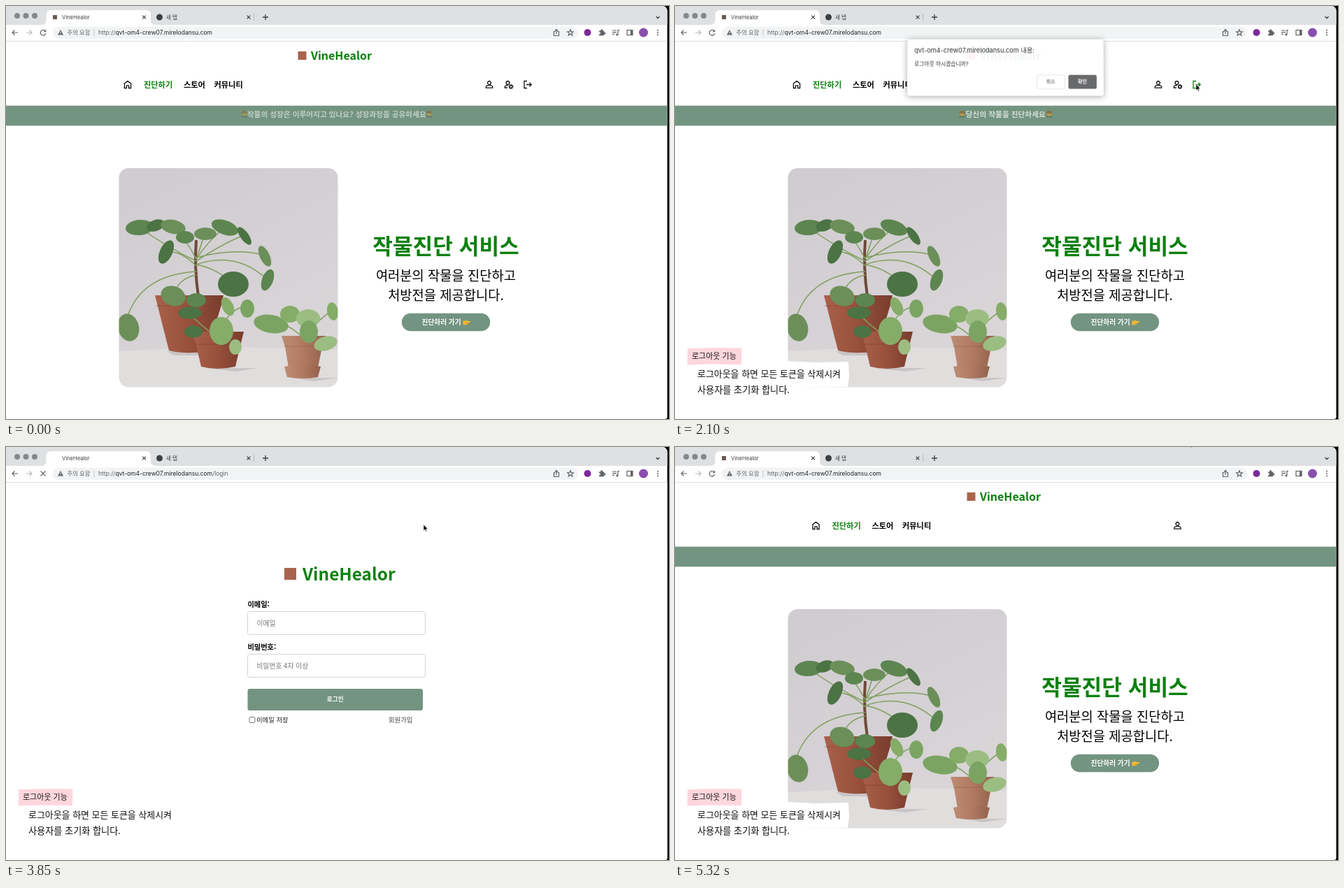
An HTML page that plays this animation: 948 by 591 pixels, repeating every 5.39 s.

```html
<!DOCTYPE html>
<html lang="ko">
<head>
<meta charset="utf-8">
<title>VineHealor</title>
<style>
html, body { margin: 0; width: 100%; height: 100%; overflow: hidden; background: #000; }
svg { position: absolute; left: 0; top: 0; overflow: visible; }
#stage, #pointer { width: 948px; height: 591px; overflow: hidden; }
text { font-family: "Noto Sans CJK KR", "Noto Sans", sans-serif; white-space: pre; }
.ui { font-family: Inter, "Noto Sans CJK KR", sans-serif; }
.bold { font-weight: 700; }
.mid { text-anchor: middle; }
.green { fill: #0c800f; }
.line { fill: none; stroke: currentColor; stroke-width: 1.3; }
.thin { fill: none; stroke: #5f6368; stroke-width: 1.2; }

/* One clock for everything: 5390 ms */
.a { animation: 5390ms linear infinite; }
.step { animation-timing-function: step-end; }
.before { animation-name: before; }
.login { animation-name: login; }
.after { animation-name: after; }
.idle { animation-name: idle; }
.busy { animation-name: busy; }
.user { animation-name: user; }
.exit { animation-name: exit; }
.hero { animation-name: hero; }
.msg1 { animation-name: msg1; }
.msg2 { animation-name: msg2; }
.note { animation-name: note; }
.move { animation-name: move; animation-timing-function: ease-in-out; }
.arrow { animation-name: arrow; }
.hand { animation-name: hand; }
#alert {
  left: 332px; top: 48px; width: 281px; height: 81px;
  transform-origin: 50% 100%; animation-name: alert;
  filter: drop-shadow(0 1px 4px rgba(0,0,0,.38));
}
@keyframes before { 0% { opacity: 1 } 64.38%, 100% { opacity: 0 } }
@keyframes login {
  0% { opacity: 0; fill-opacity: 0 }
  64.38% { opacity: 1; fill-opacity: 1 }
  72.36%, 100% { opacity: 0; fill-opacity: 0 }
}
@keyframes after { 0% { opacity: 0 } 72.36%, 100% { opacity: 1 } }
@keyframes idle { 0% { opacity: 1 } 64.38% { opacity: 0 } 74%, 100% { opacity: 1 } }
@keyframes busy { 0% { opacity: 0 } 64.38% { opacity: 1 } 74%, 100% { opacity: 0 } }
@keyframes user { 0% { color: #111 } 16.3% { color: #108010 } 27.5%, 100% { color: #111 } }
@keyframes exit { 0% { color: #111 } 30.3%, 100% { color: #108010 } }
@keyframes hero {
  0%, 72.3% { opacity: 1 }
  72.36% { opacity: 0; animation-timing-function: ease }
  85.4%, 100% { opacity: 1 }
}
@keyframes msg1 {
  0% { transform: translateY(-2.5px); opacity: .56 }
  6% { opacity: .66 }
  32.46% { transform: translateY(1.2px); opacity: .66 }
  32.47%, 100% { transform: none; opacity: 0 }
}
@keyframes msg2 {
  0%, 32.46% { transform: translateY(-3px); opacity: 0 }
  32.47% { transform: translateY(-3px); opacity: .2 }
  38% { opacity: .7 }
  51.95% { transform: translateY(-.9px) }
  60%, 100% { transform: none; opacity: .7 }
}
@keyframes note {
  0%, 11.69% { transform: translateX(-250px); animation-timing-function: cubic-bezier(.3,.5,.3,1) }
  23.4%, 100% { transform: none }
}
@keyframes alert {
  0%, 36.2% { opacity: 0; transform: perspective(600px) translateY(-8px) rotateX(20deg) }
  39.15%, 64.75% { opacity: 1; transform: perspective(600px) translateY(0) rotateX(0) }
  66.23% { opacity: .63; transform: perspective(600px) translateY(-4px) rotateX(10deg) }
  67.7%, 100% { opacity: 0; transform: perspective(600px) translateY(-8px) rotateX(20deg) }
}
@keyframes move {
  0%, 6.5% { transform: translate(733px, 36px) }
  16.7%, 25.97% { transform: translate(692px, 113px) }
  31.2%, 40.5% { transform: translate(745px, 112px) }
  51%, 64% { transform: translate(598px, 111.5px) }
  66%, 76.5% { transform: translate(597px, 111px) }
  80.5% { transform: translate(602px, 109px) }
  86.5%, 94.8% { transform: translate(735px, 8px) }
  98.5%, 100% { transform: translate(735px, -9px) }
}
@keyframes arrow {
  0% { opacity: 0 } 6.5% { opacity: 1 } 16.3% { opacity: 0 } 36.7%, 100% { opacity: 1 }
}
@keyframes hand { 0% { opacity: 0 } 16.3% { opacity: 1 } 36.7%, 100% { opacity: 0 } }
</style>
</head>
<body>
<svg id="stage" viewBox="0 0 948 591">
  <defs>
    <g id="home"><path class="line" d="M-4.6 5V-1.6L0-5.2 4.6-1.6V5H1.6V1.3H-1.6V5Z"/></g>
    <g id="person" class="line">
      <circle cy="-2.6" r="2.4"/>
      <path d="M-4.7 4.6V3.2C-4.7 1.6-1.6.9 0 .9S4.7 1.6 4.7 3.2V4.6Z"/>
    </g>
    <g id="cross"><path d="M-2.4-2.4 2.4 2.4M2.4-2.4-2.4 2.4" fill="none" stroke="#3c4043" stroke-width="1.2"/></g>
    <g id="farmer">
      <path d="M-4.5 5Q-4 1 0 1T4.5 5Z" fill="#56765a"/>
      <circle r="3" fill="#d99a35"/>
      <path d="M-5-1Q-3-2-2.6-4.6H2.6Q3-2 5-1Z" fill="#8b6526"/>
    </g>
    <g id="point">
      <path d="M-5-2H-1L0-3 1.8-2.2 1-1.4H5.3Q6.4-.2 5.3.6H2Q3 3.6 0 3.8H-5Z" fill="#f5b92e"/>
      <path d="M-1.5 1.4H1.8M-1.5 2.6H1.5" stroke="#c98517" stroke-width=".5"/>
    </g>
    <g id="links" class="bold" font-size="11.2">
      <use href="#home" x="174" y="112.5"/>
      <text class="green" x="197" y="116.7">진단하기</text>
      <text x="254" y="116.7">스토어</text>
      <text x="297.5" y="116.7">커뮤니티</text>
    </g>
    <clipPath id="frame"><rect x="161.5" y="232" width="313" height="313.5" rx="14"/></clipPath>
    <linearGradient id="wall" x1="0" y1="0" x2=".5" y2="1">
      <stop stop-color="#cfccd0"/><stop offset=".6" stop-color="#d5d1d5"/><stop offset="1" stop-color="#dad6d8"/>
    </linearGradient>
    <linearGradient id="clay">
      <stop stop-color="#a8604a"/><stop offset=".45" stop-color="#9a523d"/><stop offset="1" stop-color="#783c2c"/>
    </linearGradient>
    <linearGradient id="sand">
      <stop stop-color="#bd8c75"/><stop offset=".5" stop-color="#b07a61"/><stop offset="1" stop-color="#93604b"/>
    </linearGradient>
  </defs>

  <!-- window and tabs -->
  <path d="M0 0H938Q945.5 0 945.5 8V588Q945.5 591 942 591H0Z" fill="#fff"/>
  <path d="M0 0H938Q945.5 0 945.5 8V27H0Z" fill="#dfe0e1"/>
  <path d="M50 27Q57.5 27 57.5 20V13Q57.5 6 64.5 6H200Q207 6 207 13V20Q207 27 214 27Z" fill="#fff"/>
  <g fill="#85878a"><circle cx="16" cy="14" r="4"/><circle cx="28.5" cy="14" r="4"/><circle cx="41" cy="14" r="4"/></g>
  <rect class="a step idle" x="67" y="13" width="6" height="6" fill="#6b5a52"/>
  <g font-size="7.6" fill="#3c4043">
    <text class="ui" x="80" y="18.7">VineHealor</text>
    <text class="ui" x="229" y="18.7">새 탭</text>
  </g>
  <circle cx="219.5" cy="16" r="4.5" fill="#3c4043"/>
  <use href="#cross" x="197.5" y="16"/>
  <use href="#cross" x="347" y="16"/>
  <path d="M354.5 11V21" stroke="#b5b8bb"/>
  <path d="M367 16H375M371 12V20M929.5 15 932 17.5 934.5 15" fill="none" stroke="#3c4043" stroke-width="1.3"/>

  <!-- toolbar -->
  <path d="M0 50.5H945.5" stroke="#dcdee0"/>
  <path class="thin" d="M17 38H9M12.5 34.5 9 38 12.5 41.5"/>
  <path class="thin" d="M29 38H37M33.5 34.5 37 38 33.5 41.5" opacity=".45"/>
  <g class="a step idle"><path class="thin" d="M56 35.8A3.8 3.8 0 1 0 56.8 39"/><path d="M57.2 33.5V37.2H53.5Z" fill="#5f6368"/></g>
  <g class="a step busy"><path class="thin" d="M49.5 34.5 56.5 41.5M56.5 34.5 49.5 41.5"/></g>
  <rect x="67" y="29.5" width="751" height="17.5" rx="8.7" fill="#f1f3f4"/>
  <path d="M78 34 82 41.5H74Z" fill="#5f6368"/><path d="M78 36.5V39M78 39.7V40.7" stroke="#fff" stroke-width=".9"/>
  <text class="ui" x="87.5" y="41.2" font-size="8.3" fill="#5f6368">주의 요함</text>
  <path d="M126 33.5V43" stroke="#c3c6ca"/>
  <text class="ui" x="132" y="41.2" font-size="8.5" fill="#5f6368">http://<tspan fill="#202124">qvt-om4-crew07.mirelodansu.com</tspan><tspan class="a step login">/login</tspan></text>
  <path class="thin" d="M785.5 36.5H783.5V42.5H790.5V36.5H788.5M787 40V33.5M785 35.5 787 33.5 789 35.5"/>
  <path class="thin" d="M807 33.8 808.2 36.7 811.3 36.9 808.9 38.9 809.7 42 807 40.3 804.3 42 805.1 38.9 802.7 36.9 805.8 36.7Z"/>
  <circle cx="831.5" cy="38" r="5" fill="#7b2a9c"/>
  <path d="M848 35.5H850.3A1.5 1.5 0 1 1 853 35.5H855.2V37.6A1.5 1.5 0 1 1 855.2 40.3V42.3H848V40A1.4 1.4 0 1 0 848 37.5Z" fill="#5f6368"/>
  <path class="thin" d="M867 35H873M867 37.7H873M867 40.4H870M875 41V34.7H877"/><circle cx="873.8" cy="41" r="1.5" fill="#5f6368"/>
  <rect class="thin" x="888" y="34.5" width="8" height="7"/><path d="M893 34.5H896V41.5H893Z" fill="#5f6368"/>
  <circle cx="911.5" cy="38" r="6.5" fill="#8a4fae"/>
  <g fill="#5f6368"><circle cx="932" cy="34.7" r="1"/><circle cx="932" cy="38" r="1"/><circle cx="932" cy="41.3" r="1"/></g>

  <!-- page head -->
  <rect x="417.5" y="65" width="12" height="12" fill="#a8644c"/>
  <text class="green bold" x="436" y="77" font-size="16">VineHealor</text>
  <g class="a step before" color="#111">
    <use href="#links"/>
    <g class="a step user"><use href="#person" x="691" y="112.5"/></g>
    <path class="line" d="M717 117H713.3V115.7C713.3 114 716 113.3 718 113.3"/>
    <circle class="line" cx="717.5" cy="109.9" r="2.4"/>
    <circle class="line" cx="722" cy="115.4" r="1.9"/>
    <circle class="line" cx="722" cy="115.4" r="2.9" stroke-dasharray="1.1 1.18"/>
    <g class="a step exit"><path class="line" d="M745 107.5H741V117.5H745M744 112.5H751M748.5 109.8 751.2 112.5 748.5 115.2"/></g>
  </g>
  <g class="a step after" color="#111">
    <use href="#links" x="27.5"/>
    <use href="#person" x="718.5" y="112.5"/>
  </g>
  <rect y="142.6" width="945.5" height="28.7" fill="#739480"/>
  <g class="a step before bold" font-size="10.68" fill="#fff">
    <g class="a msg1">
      <use href="#farmer" x="341" y="157"/><use href="#farmer" x="605" y="157"/>
      <text class="mid" x="472.8" y="161">작물의 성장은 이루어지고 있나요? 성장과정을 공유하세요</text>
    </g>
    <g class="a msg2">
      <use href="#farmer" x="410.5" y="157"/><use href="#farmer" x="535" y="157"/>
      <text class="mid" x="472.8" y="161">당신의 작물을 진단하세요</text>
    </g>
  </g>

  <!-- hero -->
  <g class="a hero">
    <g clip-path="url(#frame)">
      <path d="M161 232H475V546H161Z" fill="url(#wall)"/>
      <path d="M161 494Q320 484 475 492V546H161Z" fill="#e0dddd"/>
      <path d="M230 494H330L300 500H240ZM285 518H360L330 523ZM410 532H474L440 537Z" fill="#c9c4c5"/>
      <path d="M213 414H311L307 431 288 494Q258 499 233 493Z" fill="url(#clay)"/>
      <path d="M214 429H308" stroke="#7d412f" opacity=".5"/>
      <path d="M272 335Q269 375 275 415" fill="none" stroke="#6d4a39" stroke-width="4"/>
      <path d="M272 365Q230 345 191 317M272 362Q255 330 239 316M272 362Q280 340 284 325M272 362Q290 335 313 317M272 365Q310 340 340 328M272 360Q330 345 370 357M272 370Q330 350 374 392M272 370Q300 375 325 397M272 372Q250 350 230 352M272 380Q190 385 172 450M272 385Q245 390 240 415M303 470Q320 430 345 430M303 475Q270 450 262 439M425 475Q400 450 379 455M425 475V442M425 475Q450 445 467 436" fill="none" stroke="#819f5f" stroke-width="1.5"/>
      <path d="M266 466H340L335 486 328 516Q302 522 279 516L272 486Z" fill="url(#clay)"/>
      <path d="M270 484H336" stroke="#6f3828" opacity=".5"/>
      <path d="M394 472H457L452 488 446 517H404L399 488Z" fill="url(#sand)"/>
      <path d="M398 487H453" stroke="#8a5945" opacity=".5"/>
      <path d="M398 516Q424 510 450 516L446 531Q424 535 402 531Z" fill="url(#sand)"/>
      <g id="leaves"></g>
    </g>
    <text class="green bold mid" x="629" y="355" font-size="31.2">작물진단 서비스</text>
    <g class="mid" font-size="18.75">
      <text x="629" y="393">여러분의 작물을 진단하고</text>
      <text x="629" y="421">처방전을 제공합니다.</text>
    </g>
    <rect x="565.8" y="439.7" width="126.4" height="25.6" rx="12.8" fill="#739480"/>
    <text class="bold" x="594.5" y="456.2" font-size="9.7" fill="#fff">진단하러 가기</text>
    <use href="#point" x="658.5" y="452.5"/>
  </g>

  <!-- login page -->
  <g class="a step login">
    <path d="M0 51H945.5V588Q945.5 591 942 591H0Z" fill="#fff"/>
    <rect x="398" y="173" width="17" height="17" fill="#a8644c"/>
    <text class="green bold" x="424" y="190.5" font-size="24.4">VineHealor</text>
    <g class="bold" font-size="10.2"><text x="345.5" y="228.5">이메일:</text><text x="345.5" y="289.7">비밀번호:</text></g>
    <g fill="#fff" stroke="#d3d3d3">
      <rect x="345.5" y="235.5" width="254" height="33" rx="3"/>
      <rect x="345.5" y="296.5" width="254" height="33" rx="3"/>
    </g>
    <g font-size="9.75" fill="#757575"><text x="358.5" y="255.5">이메일</text><text x="358.5" y="316.7">비밀번호 4자 이상</text></g>
    <rect x="345.5" y="346" width="250.5" height="31" rx="3" fill="#739480"/>
    <text class="bold mid" x="470.7" y="364.3" font-size="8.6" fill="#fff">로그인</text>
    <rect x="348" y="386.5" width="8" height="8" rx="1.5" fill="#fff" stroke="#767676"/>
    <g font-size="9.35" fill="#222"><text x="358" y="394.2">이메일 저장</text><text x="547" y="394.2" fill="#444">회원가입</text></g>
  </g>

  <!-- caption -->
  <g class="a note">
    <path d="M26 510 90 511 160 508 200 510 248 509 249 530 247 545 170 546 168 559 27 558Z" fill="#fff"/>
    <path d="M18 490 60 489 95.5 489.5 95 513 50 512.5 17.5 513.5Z" fill="#ffd6dd"/>
    <g fill="#111" font-weight="500">
      <text x="24" y="505" font-size="11">로그아웃 기능</text>
      <text x="32" y="531.3" font-size="12.95">로그아웃을 하면 모든 토큰을 삭제시켜</text>
      <text x="32" y="554.3" font-size="13.15">사용자를 초기화 합니다.</text>
    </g>
  </g>
</svg>

<svg id="alert" class="a" viewBox="0 0 281 81">
  <rect width="281" height="81" rx="3.5" fill="#fff"/>
  <text class="ui" x="10" y="19.5" font-size="9.2" fill="#202124">qvt-om4-crew07.mirelodansu.com 내용:</text>
  <text class="ui" x="10" y="37.7" font-size="7.8" fill="#202124">로그아웃 하시겠습니까?</text>
  <rect x="185.5" y="51" width="40" height="20" rx="2.5" fill="#fff" stroke="#e3e4e6"/>
  <rect x="230.5" y="51" width="40.5" height="20" rx="2.5" fill="#606163"/>
  <text class="ui mid" x="205.3" y="63.5" font-size="7.2" fill="#3c4043">취소</text>
  <text class="ui mid bold" x="250.5" y="63.5" font-size="7.2" fill="#fff">확인</text>
</svg>

<svg id="pointer" viewBox="0 0 948 591">
  <g class="a move">
    <path class="a step arrow" d="M0 0V8.7L2 6.9 3.3 10 4.7 9.4 3.4 6.4H6.2Z" fill="#000" stroke="#fff" stroke-width=".6"/>
    <path class="a step hand" d="M.3 1Q1.3-.2 2.2 1L2.9 4 4.8 4.2 6.7 4.7Q8.2 5 8 7L7.3 10.5H2.7L-.3 7Q-.4 5.8 1.2 6.5Z" fill="#fff" stroke="#111" stroke-width=".9"/>
  </g>
</svg>

<script>
// Each leaf: centre x, centre y, half width, half height, tilt
const leaves = [
  [191, 317, 20, 11, -5], [214, 314, 13, 8, -20], [239, 316, 18, 10, 12], [256, 331, 13, 9, 0],
  [229, 352, 9, 18, 25], [285, 326, 16, 9, 0], [313, 317, 20, 10, 20], [341, 329, 6, 15, -35],
  [370, 358, 7, 16, -25], [374, 392, 8, 16, 20], [325, 398, 22, 18, 0], [239, 415, 18, 14, 20],
  [272, 421, 14, 10, 0], [263, 439, 17, 9, 0], [175, 460, 15, 20, -15], [317, 430, 8, 14, -25],
  [268, 466, 13, 9, 0], [345, 433, 10, 13, 0], [308, 465, 17, 20, 0], [328, 488, 9, 11, 0],
  [379, 455, 25, 13, 10], [406, 441, 14, 12, 0], [432, 447, 17, 13, 0], [433, 466, 13, 16, 0],
  [467, 437, 8, 13, -10], [457, 483, 17, 10, -15]
];
const dark = ["#5c8550", "#4b7344", "#6c8f59"], light = ["#85ac68", "#9cbd82", "#7ba463"];
document.getElementById("leaves").innerHTML = leaves.map(([x, y, w, h, tilt], i) => {
  const tones = y > 425 && x > 300 ? light : dark;
  return `<ellipse rx="${w}" ry="${h}" fill="${tones[i % 3]}" transform="translate(${x} ${y}) rotate(${tilt})"/>`;
}).join("");
</script>
</body>
</html>
```
